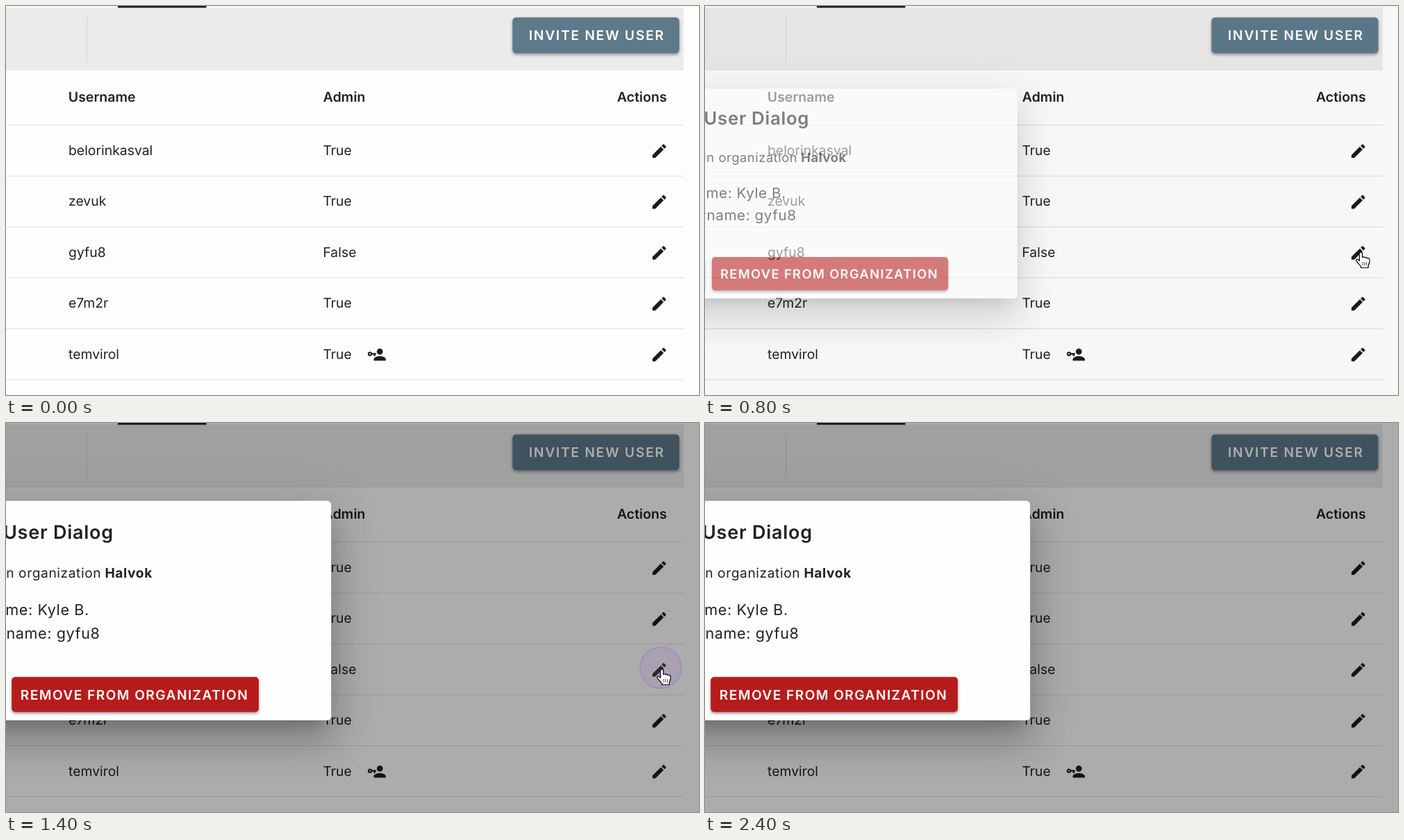
An HTML page that plays this animation: 998x561 px, repeating every 3000 ms.

```html
<!DOCTYPE html>
<html lang="en">
<head>
<meta charset="utf-8">
<title>Edit user dialog</title>
<style>
  html, body { margin: 0; width: 100%; height: 100%; overflow: hidden; background: #fdfdfd; }
  svg { display: block; width: 100vw; height: 100vh; }
  text { font-family: Inter, Roboto, sans-serif; fill: #212121; white-space: pre; text-rendering: geometricPrecision; }
</style>
</head>
<body>
<svg id="stage" viewBox="0 0 998 561" xmlns="http://www.w3.org/2000/svg">
  <defs>
    <filter id="soft" x="-20%" y="-60%" width="140%" height="220%"><feGaussianBlur stdDeviation="2"/></filter>
    <filter id="near" x="-20%" y="-40%" width="140%" height="180%"><feGaussianBlur stdDeviation="10.7"/></filter>
    <filter id="mid" x="-20%" y="-50%" width="140%" height="200%"><feGaussianBlur stdDeviation="27"/></filter>
    <filter id="far" x="-20%" y="-50%" width="140%" height="200%"><feGaussianBlur stdDeviation="33"/></filter>
    <path id="pencil" d="M20.71 7.04C21.1 6.65 21.1 6 20.71 5.63L18.37 3.29C18 2.9 17.35 2.9 16.96 3.29L15.12 5.12L18.87 8.87M3 17.25V21H6.75L17.81 9.93L14.06 6.18Z"/>
    <path id="owner" d="M11 10V12H10V14H8V12H5.83C5.42 13.17 4.31 14 3 14A3 3 0 0 1 0 11A3 3 0 0 1 3 8C4.31 8 5.42 8.83 5.83 10H11M3 10A1 1 0 0 0 2 11A1 1 0 0 0 3 12A1 1 0 0 0 4 11A1 1 0 0 0 3 10M16 14C18.67 14 24 15.34 24 18V20H8V18C8 15.34 13.33 14 16 14M16 12A4 4 0 0 1 12 8A4 4 0 0 1 16 4A4 4 0 0 1 20 8A4 4 0 0 1 16 12Z"/>
  </defs>
  <g id="page"></g>
  <rect id="scrim" width="998" height="561" fill="#000"/>
  <g id="dialog"></g>
  <circle id="ripple" cx="943" cy="353" fill="#9a78c4" fill-opacity=".3" stroke="#9a7fc6"/>
  <g id="cursor" transform="translate(934.5 353.6) scale(1.1 1.03)" stroke="#111" stroke-linejoin="round" stroke-linecap="round">
    <path fill="#fff" stroke-width="1.2" d="M7.2 13.6V3.2C7.2 .8 11 .8 11 3.2V8.8C11.4 7.6 14 7.8 14.2 9.2C14.8 8.2 17.2 8.6 17.4 10.1C18.2 9.3 20.6 9.8 20.6 12C20.7 15.5 20.2 17.8 18.8 20.2V23.2H9.2V21.2C7.4 19.4 5.6 16.6 3.4 14.2C2 12.2 4 10.4 5.8 11.9Z"/>
    <path fill="none" stroke-width=".7" d="M11.4 15.5V19.6M13.9 15.5V19.6M16.4 15.5V19.6"/>
  </g>
</svg>
<script>
const NS = 'http://www.w3.org/2000/svg';
const $ = id => document.getElementById(id);
const page = $('page'), dialog = $('dialog');
const LOOP = 3000, STEP = 200;

function set(el, attrs) {
  for (const k in attrs) el.setAttribute(k, attrs[k]);
  return el;
}

function add(parent, tag, attrs) {
  return parent.appendChild(set(document.createElementNS(NS, tag), attrs));
}

function rect(parent, x, y, width, height, fill, more) {
  return add(parent, 'rect', { x, y, width, height, fill, ...more });
}

function label(parent, x, y, size, str, more) {
  const el = add(parent, 'text', { x, y, 'font-size': size, ...more });
  el.textContent = str;
  return el;
}

function icon(name, x, y, scale) {
  add(page, 'use', { href: '#' + name, fill: '#1c1c1c', transform: `translate(${x} ${y}) scale(${scale})` });
}

function button(parent, x, y, w, h, fill) {
  rect(parent, x, y + 2.2, w, h, '#000', { rx: 5, opacity: 0.4, filter: 'url(#soft)' });
  rect(parent, x, y, w, h, fill, { rx: 5 });
}

function buildPage() {
  rect(page, 0, 0, 998, 561, '#fdfdfd');
  rect(page, 0, 2, 976, 91, '#ebebeb');
  rect(page, 161, 0, 127.5, 2.5, '#1c1c1c');
  rect(page, 116, 14, 1, 67, '#d4d4d4');
  button(page, 729.5, 16.5, 240, 51.5, '#5d798a');
  label(page, 753, 49, 19.2, 'INVITE NEW USER', { 'font-weight': 600, 'letter-spacing': 1.75, style: 'fill:#fff' });

  const heads = [[89.8, 'Username'], [456.8, 'Admin'], [879.9, 'Actions']];
  for (const [x, str] of heads) label(page, x, 138.3, 19.5, str, { 'font-weight': 600 });

  const users = [['belorinkasval', 1], ['zevuk', 1], ['gyfu8', 0], ['e7m2r', 1], ['temvirol', 1]];
  rect(page, 0, 171.3, 976, 1.1, '#e2e2e2');
  users.forEach(([name, admin], i) => {
    const dy = i * 73.4;
    label(page, 90, 215 + dy, 19.4, name);
    label(page, 456.4, 215 + dy, 19.4, admin ? 'True' : 'False');
    icon('pencil', 927.7, 196.1 + dy, 1.09);
    rect(page, 0, 244.7 + dy, 976, 1.1, '#e2e2e2');
  });
  icon('owner', 521, 489.7, 1.085);
}

function buildDialog() {
  const shadow = (dy, grow, opacity, id) =>
    rect(dialog, -372 - grow, 112.3 + dy - grow, 840 + 2 * grow, 316.5 + 2 * grow, '#000',
      { rx: 5, opacity, filter: `url(#${id})` });
  shadow(13, 11.4, 0.12, 'far');
  shadow(34, 4, 0.14, 'mid');
  shadow(16, -10, 0.2, 'near');
  rect(dialog, -372, 112.3, 840.2, 316.5, '#fefefe', { rx: 5.5 });

  label(dialog, -4, 166.8, 27, 'User Dialog', { 'font-weight': 600, 'letter-spacing': 0.75 });
  label(dialog, -5, 223, 19.2, 'in organization', { 'letter-spacing': 0.58 });
  label(dialog, 142.4, 223, 19.2, 'Halvok', { 'font-weight': 700, 'letter-spacing': 0.6 });
  label(dialog, -30.3, 277, 21.6, 'Name: Kyle B.', { 'letter-spacing': 0.6 });
  label(dialog, -50.5, 311, 21.6, 'Username: gyfu8', { 'letter-spacing': 0.6 });

  button(dialog, -160, 366.3, 157, 50.5, '#b71c1c');
  button(dialog, 8.2, 366.3, 355.8, 50.5, '#b71c1c');
  label(dialog, 20.8, 398.6, 19.2, 'REMOVE FROM ORGANIZATION',
    { 'font-weight': 600, 'letter-spacing': 1.42, style: 'fill:#fff' });
}

// Value at step n after the start; the last one holds.
const pick = (values, n) => n < 0 ? 0 : values[Math.min(n, values.length - 1)];

function draw(ms) {
  const t = Math.floor((ms % LOOP) / STEP) * STEP;

  const open = (t - 600) / STEP;
  const p = pick([0.256, 0.56, 0.955, 1], open);
  const s = 0.9 + 0.1 * p;
  set(dialog, { opacity: p, transform: `translate(48.1 270.5) scale(${s}) translate(-48.1 -270.5)` });
  set($('scrim'), { opacity: pick([0, 0.024, 0.245, 0.32], open) });

  const click = (t - 1200) / STEP;
  const on = click >= 0 && t < 2000;
  const grow = on ? 1 - Math.pow(1 - Math.min(1, click / 2), 2) : 0;
  set($('ripple'), {
    r: 24 + 7.5 * grow,
    'stroke-width': 1 + 1.3 * grow,
    opacity: on ? pick([0.25, 0.65, 0.95, 1], click) : 0
  });

  set($('cursor'), { opacity: t >= 400 && t < 2400 ? 1 : 0 });
}

function tick() {
  draw(performance.now());
  requestAnimationFrame(tick);
}

buildPage();
buildDialog();
tick();
</script>
</body>
</html>
```
